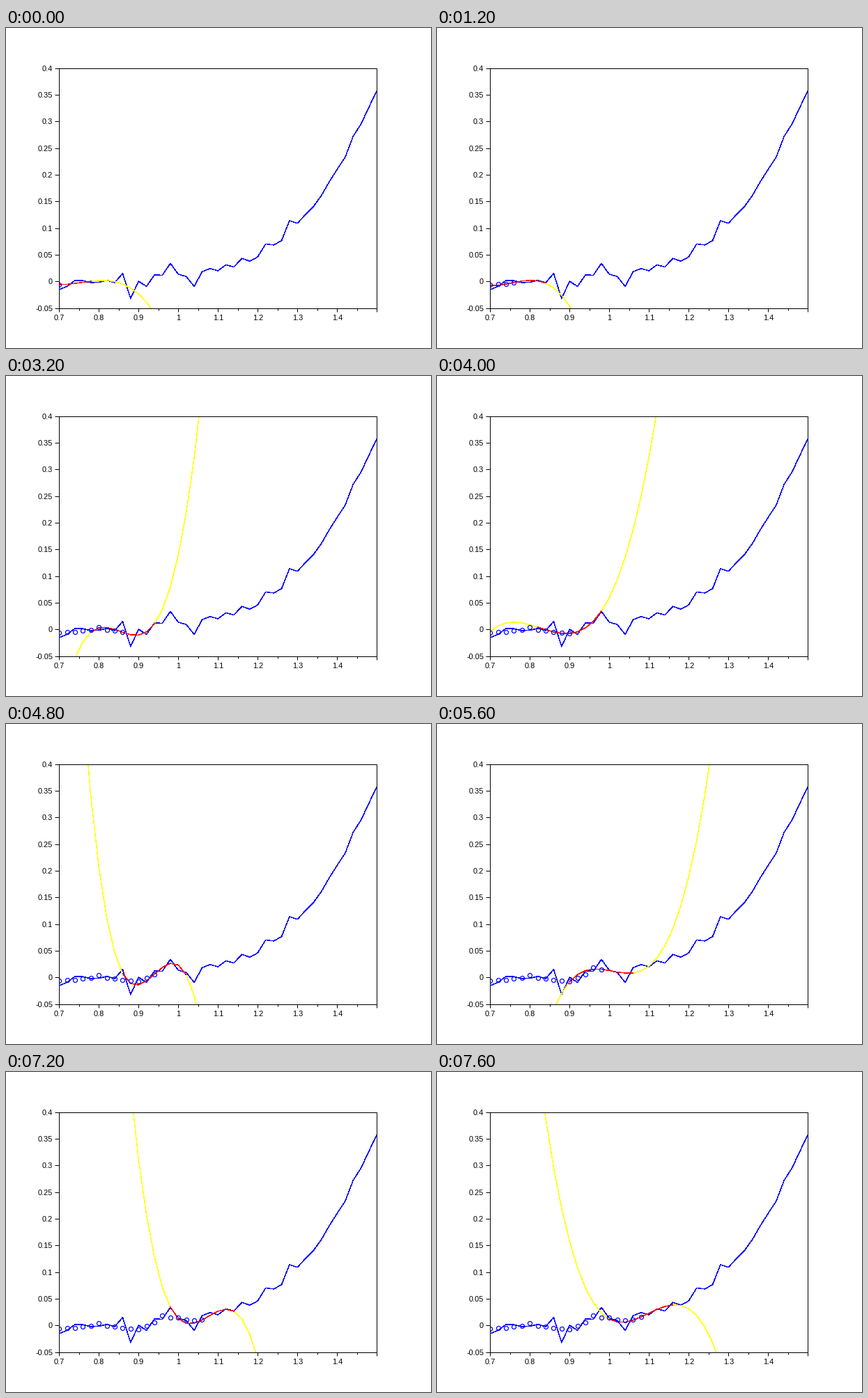
A matplotlib script for the animation above (8 s loop, 610 by 460 pixels).

```python
import numpy as np
import matplotlib.pyplot as plt
from matplotlib.animation import FuncAnimation
from matplotlib.ticker import FuncFormatter, MultipleLocator

W, H, DPI = 610, 460, 64
PX = 72 / DPI  # one pixel in points
HALF, DEGREE, STEPS = 4, 3, 20

plt.rcParams["font.family"] = "Liberation Sans"
plt.rcParams["axes.unicode_minus"] = False
plt.rcParams["path.simplify"] = False

# The first HALF samples lie left of the visible range.
INDEX = np.arange(-HALF, 41)
X = 0.7 + 0.02 * INDEX

# The main outliers of the measured signal: step -> height in pixels.
KINKS = {-4: 12, -2: 3, -1: -2, 0: -10, 1: -6, 7: -3, 8: 13, 9: -24,
         10: -3, 11: -12, 12: 4, 14: 12, 15: -4, 16: -5, 17: -20, 18: -2,
         19: 2, 21: 6, 22: -3, 23: 6, 26: 9, 29: 18, 37: 8}


def signal():
    """A small step, a power-law rise, a faint ripple and some outliers."""
    step = 14 / (1 + np.exp(12 - INDEX))
    rise = 262 * (np.clip(INDEX - 16, 0, None) / 24) ** 2.5
    ripple = 2 * np.cos(np.pi / 2 * (INDEX - 2.4))
    kinks = np.array([KINKS.get(i, 0) for i in INDEX.tolist()])
    return (step + rise + ripple + kinks) * 0.45 / 345


def local_fit(k):
    """Cubic through the window around sample k, on the whole grid."""
    offset = INDEX - k
    window = np.abs(offset) <= HALF
    coeffs = np.polyfit(offset[window], SAMPLES[window], DEGREE)
    return window, np.polyval(coeffs, offset)


SAMPLES = signal()
FITS = [local_fit(k) for k in range(STEPS)]
SMOOTHED = np.array([fit[k + HALF] for k, (_, fit) in enumerate(FITS)])

fig = plt.figure(figsize=(W / DPI, H / DPI), dpi=DPI, facecolor="white")
ax = fig.add_axes([76.2 / W, 57.3 / H, 456.2 / W, 345 / H])
ax.set(xlim=(0.7, 1.5), ylim=(-0.05, 0.4))

ax.xaxis.set_major_locator(MultipleLocator(0.1))
ax.xaxis.set_minor_locator(MultipleLocator(0.05))
ax.yaxis.set_major_locator(MultipleLocator(0.05))
# The right edge carries no label.
ax.xaxis.set_major_formatter(
    FuncFormatter(lambda v, _: f"{round(v, 2):g}" if v < 1.45 else ""))
ax.yaxis.set_major_formatter(FuncFormatter(lambda v, _: f"{round(v, 2) + 0:g}"))
ax.tick_params(width=PX, length=5 * PX, pad=4 * PX, labelsize=11 * PX)
ax.tick_params(axis="y", length=6 * PX, pad=3 * PX)
ax.tick_params(which="minor", width=PX, length=3 * PX)
for spine in ax.spines.values():
    spine.set_linewidth(PX)


def add_line(color, **style):
    # Without smoothing, a hairline covers about one pixel.
    return ax.plot([], [], color=color, lw=0.4 * PX, antialiased=False, **style)[0]


add_line("blue").set_data(X, SAMPLES)
extended = add_line("yellow")
fitted = add_line("red")
dots = add_line("blue", ls="none", marker="o", ms=6 * PX, mew=1.25 * PX, mfc="none")


def update(k):
    window, fit = FITS[k]
    extended.set_data(X, fit)
    fitted.set_data(X[window], fit[window])
    dots.set_data(X[HALF:HALF + k + 1], SMOOTHED[:k + 1])
    return extended, fitted, dots


anim = FuncAnimation(fig, update, frames=STEPS, interval=400,
                     init_func=lambda: update(0), repeat=True, repeat_delay=0)
plt.show()
```
